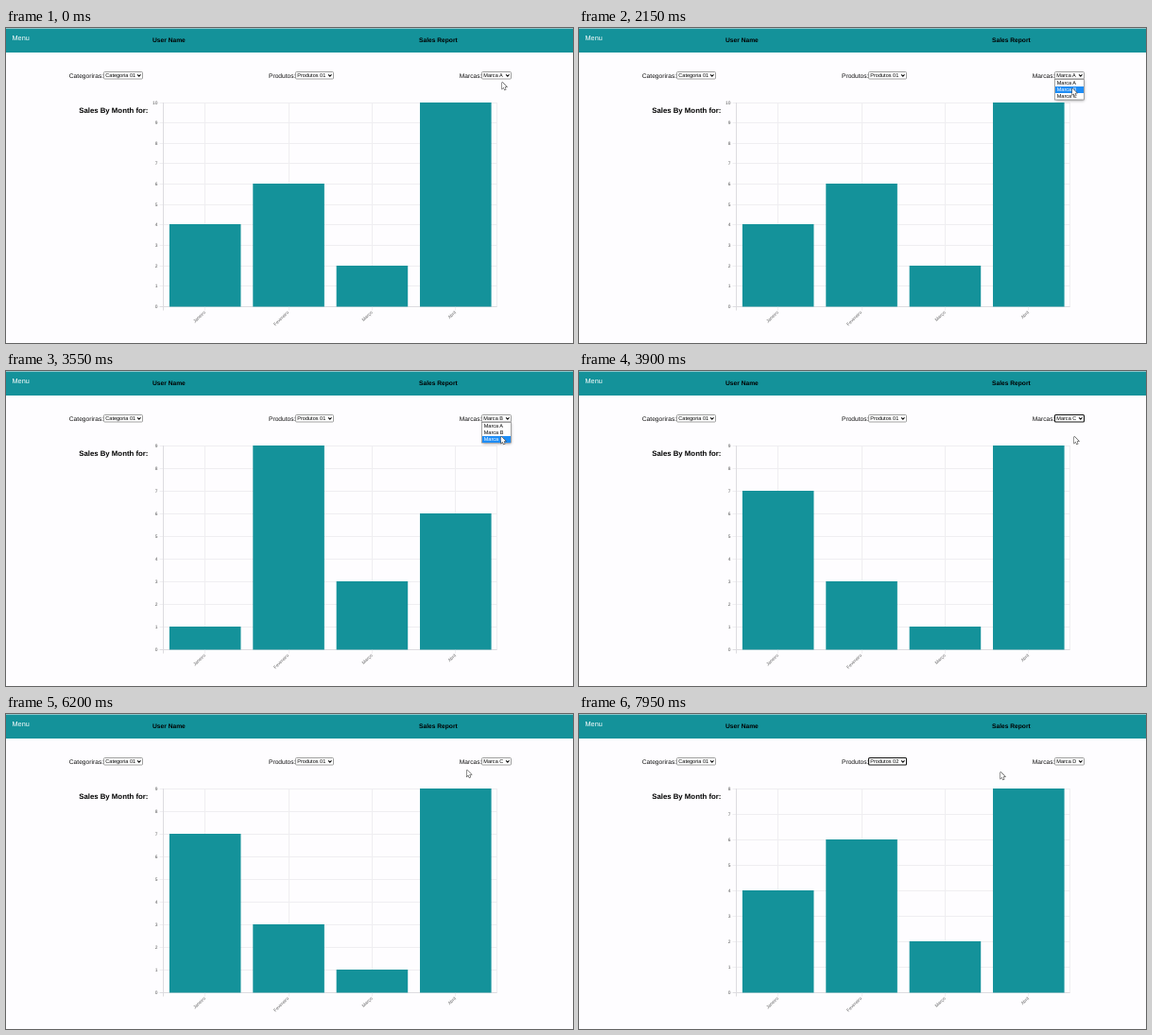
An HTML page with a canvas for the animation above (8000 ms loop, 600 by 334 pixels).

```html
<!DOCTYPE html>
<html lang="pt">
<head>
<meta charset="utf-8">
<title>Sales Report</title>
<style>
  html, body { margin: 0; width: 100%; height: 100%; overflow: hidden; background: #fefdff; }
  canvas { display: block; width: 600px; height: 334px; }
</style>
</head>
<body>
<canvas id="stage"></canvas>
<script>
const canvas = document.getElementById('stage');
const ctx = canvas.getContext('2d');
const ratio = window.devicePixelRatio || 1;
canvas.width = 600 * ratio;
canvas.height = 334 * ratio;

const LOOP = 8000, STEP = 50;
const TEAL = '#14929a', PAGE = '#fefdff', GRID = '#efeef1', AXIS = '#dddce0';
const FONT = '"Liberation Sans", Arial, sans-serif';
const ROW = 7, LIST_TOP = 54.5;

const months = ['Janeiro', 'Fevereiro', 'Março', 'Abril'];
const sales = { A: [4, 6, 2, 10], B: [1, 9, 3, 6], C: [7, 3, 1, 9], D: [4, 6, 2, 8] };
const plot = { left: 166.5, right: 520, top: 79, bottom: 295.5 };

const category = { label: 'Categoriras:', labelX: 66.8, x: 103.5, w: 41 };
const product = { label: 'Produtos:', labelX: 278, x: 306.5, w: 40, items: ['Produtos 01', 'Produtos 02'] };
const brand = { label: 'Marcas:', labelX: 479.7, x: 503.5, w: 31, items: ['Marca A', 'Marca B', 'Marca C'] };

// Each list opens, then closes on a choice (or is dismissed without one).
const visits = [
  { menu: brand, open: 1400, close: 2350, shows: 'B' },
  { menu: brand, open: 2950, close: 3900, shows: 'C' },
  { menu: brand, open: 5400, close: 6100 },
  { menu: product, open: 6550, close: 6800, shows: 'D' }
];

// Pointer moves: start, end, x, y; it rests in between.
const home = { x: 525, y: 57.5 };
const moves = [
  [50, 350, 531, 49], [1400, 1850, 526, 65], [2050, 2150, 522, 64],
  [2500, 2750, 525, 48.5], [2950, 3550, 524, 69.5], [3950, 5050, 519, 49.5],
  [5450, 5950, 512, 61], [6100, 6525, 338, 49], [6550, 6750, 328, 63],
  [7700, 7950, 446, 61.5]
];

function pointerAt(t) {
  let { x, y } = home;
  for (const [start, end, toX, toY] of moves) {
    const p = Math.min(1, Math.max(0, (t - start) / (end - start)));
    const e = p * p * (3 - 2 * p);
    x += (toX - x) * e;
    y += (toY - y) * e;
  }
  return { x, y };
}

function stateAt(t) {
  const state = { shown: 'A', productIndex: 0, focus: null, open: null, age: 0 };
  for (const { menu, open, close, shows } of visits) {
    if (t < open) break;
    state.focus = null;
    if (t < close) {
      state.open = menu;
      state.age = t - open;
    } else if (shows) {
      state.shown = shows;
      state.focus = menu;
      if (menu === product) state.productIndex = 1;
    }
  }
  return state;
}

function rect(x, y, w, h, color) {
  ctx.fillStyle = color;
  ctx.fillRect(x, y, w, h);
}

function line(points, width, color) {
  ctx.beginPath();
  points.forEach(([x, y]) => ctx.lineTo(x, y));
  ctx.lineWidth = width;
  ctx.strokeStyle = color;
  ctx.stroke();
}

function text(str, x, y, size, { color = '#111', weight = '', align = 'left', base = 'alphabetic' } = {}) {
  ctx.font = `${weight} ${size}px ${FONT}`;
  ctx.fillStyle = color;
  ctx.textAlign = align;
  ctx.textBaseline = base;
  ctx.fillText(str, x, y);
}

function drawHeader() {
  const title = { weight: 'bold', color: '#000' };
  rect(0, 0, 600, 26, TEAL);
  rect(0, 0, 600, 1, '#8cc5ca');
  text('Menu', 6.5, 12.8, 7.3, { color: '#fff' });
  text('User Name', 155, 15, 6.67, title);
  text('Sales Report', 437, 15, 6.67, title);
  text('Sales By Month for:', 77.2, 89.5, 7.8, title);
}

function drawChart(values) {
  const max = Math.max(...values);
  const { left, right, top, bottom } = plot;
  const unit = (bottom - top) / max, pitch = (right - left) / values.length;
  const barWidth = pitch * 0.855;

  for (let v = 0; v <= max; v++) {
    const y = bottom - v * unit;
    rect(left - 4, Math.round(y - 0.5), right - left + 4, 1, v ? GRID : AXIS);
    text(v, left - 6, y + 0.2, 4.9, { color: '#555', align: 'right', base: 'middle' });
  }
  rect(Math.floor(left), top, 1, bottom - top + 4, AXIS);
  rect(Math.floor(right) - 1, top, 1, bottom - top, GRID);

  values.forEach((v, i) => {
    const x = left + pitch * (i + 0.5), y = Math.floor(bottom - v * unit);
    rect(Math.round(x - 0.5), top, 1, bottom - top + 4, GRID);
    rect(x - barWidth / 2, y, barWidth, bottom - y, TEAL);
    ctx.save();
    ctx.translate(x - 0.3, 301);
    ctx.rotate(-Math.PI / 4.1);
    text(months[i], 0, 0, 4.8, { color: '#666', align: 'right', base: 'middle' });
    ctx.restore();
  });
}

function drawSelect({ label, labelX, x, w }, value, focused) {
  text(label, labelX, 52.5, 6.67);
  ctx.beginPath();
  ctx.roundRect(x, 46.5, w, 7.5, 1);
  ctx.fillStyle = '#fff';
  ctx.fill();
  ctx.lineWidth = focused ? 1.1 : 0.8;
  ctx.strokeStyle = focused ? '#181818' : '#888';
  ctx.stroke();
  text(value, x + 1.8, 52.4, 5.56, { color: '#000' });
  const cx = x + w - 3.7;
  line([[cx - 1.7, 49.4], [cx, 51.2], [cx + 1.7, 49.4]], 1.1, '#111');
}

function drawList({ x, w, items }, selected, pointer, age) {
  const h = items.length * ROW + 0.5;
  ctx.save();
  ctx.shadowColor = 'rgba(0,0,0,.4)';
  ctx.shadowBlur = 3 * ratio;
  ctx.shadowOffsetX = ctx.shadowOffsetY = 0.7 * ratio;
  rect(x, LIST_TOP, w, h, '#fff');
  ctx.restore();
  if (age < STEP) return; // opens blank

  ctx.lineWidth = 0.6;
  ctx.strokeStyle = '#777';
  ctx.strokeRect(x, LIST_TOP, w, h);
  const hover = Math.floor((pointer.y - LIST_TOP) / ROW);
  const active = hover < 0 ? selected : Math.min(hover, items.length - 1);
  items.forEach((item, i) => {
    const y = LIST_TOP + 0.5 + i * ROW;
    if (i === active) rect(x + 0.5, y, w - 1, ROW, '#1e8df5');
    text(item, x + 2.2, y + 5.2, 5.56, { color: i === active ? '#fff' : '#000' });
  });
}

function drawPointer({ x, y }) {
  const arrow = [[0, 0], [0, 6.8], [1.6, 5.4], [2.7, 8], [3.8, 7.5], [2.7, 5], [4.8, 4.8], [0, 0]];
  line(arrow.map(([dx, dy]) => [x + dx, y + dy]), 1.1, '#444');
  ctx.fillStyle = '#fff';
  ctx.fill();
}

function draw(t) {
  const pointer = pointerAt(t);
  const { shown, productIndex, focus, open, age } = stateAt(t);

  ctx.setTransform(ratio, 0, 0, ratio, 0, 0);
  ctx.textRendering = 'geometricPrecision';
  rect(0, 0, 600, 334, PAGE);
  drawHeader();
  drawChart(sales[shown]);

  drawSelect(category, 'Categoria 01', false);
  drawSelect(product, product.items[productIndex], focus === product);
  drawSelect(brand, 'Marca ' + shown, focus === brand);
  if (open) {
    const selected = open === brand ? brand.items.indexOf('Marca ' + shown) : productIndex;
    drawList(open, selected, pointer, age);
  }
  drawPointer(pointer);
}

const start = performance.now();
function tick() {
  const t = (performance.now() - start) % LOOP;
  draw(Math.floor(t / STEP) * STEP);
  requestAnimationFrame(tick);
}
tick();
</script>
</body>
</html>
```
